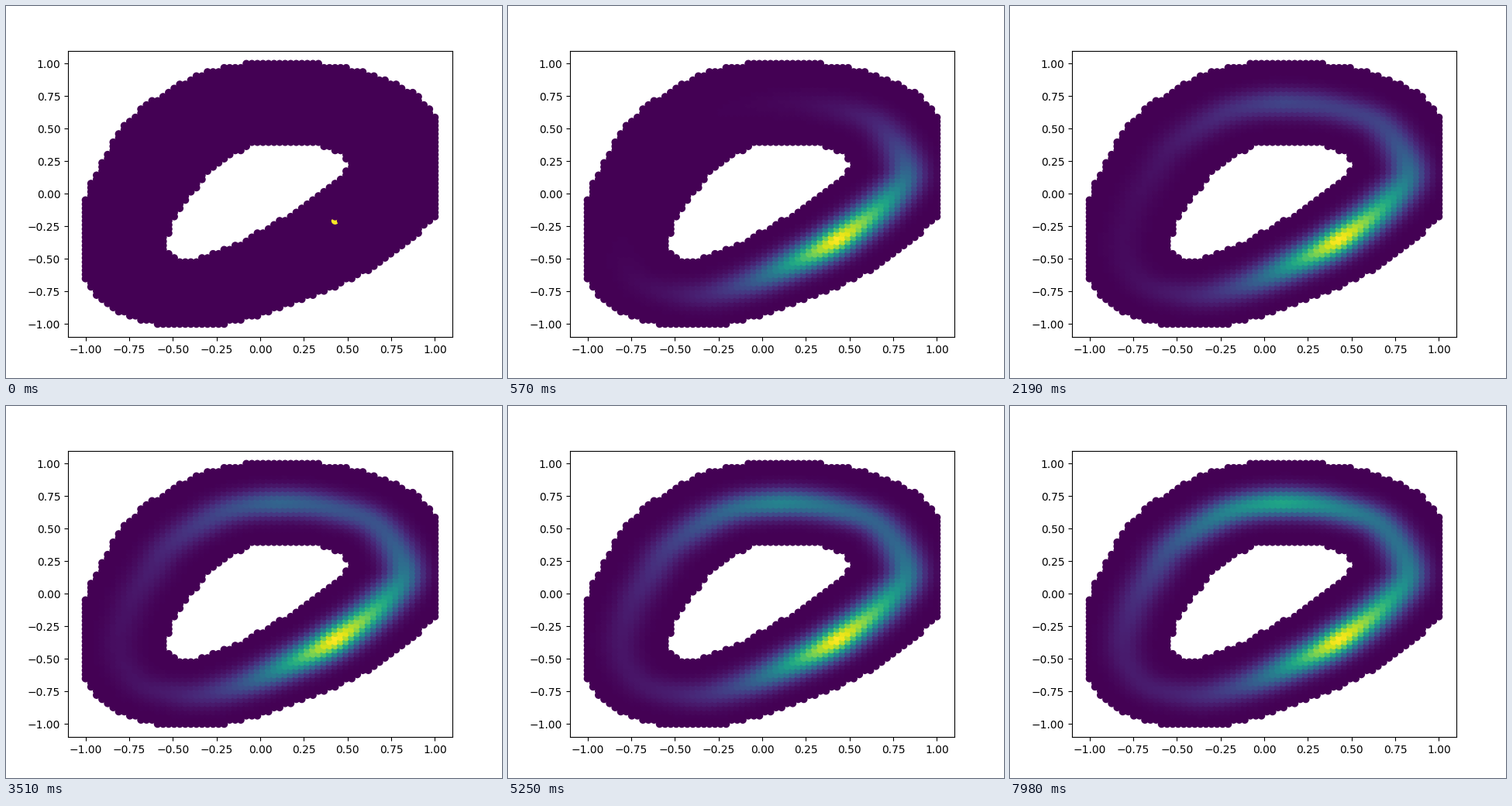
These frames come from a looping animation (640 by 480 pixels, 8000 ms). A matplotlib script:

```python
import numpy as np
import matplotlib.pyplot as plt
from matplotlib.animation import FuncAnimation

FRAMES, INTERVAL = 250, 32
GRID, STEPS = 64, 60
EARLY, END = 0.57, 7.98   # seconds
SIGMA = 0.073

# Key points of the ridge, from the main peak around to it again
RIDGE = np.array([(0.43, -0.345), (0.71, -0.05), (0.825, 0.20), (0.68, 0.53),
                  (0.42, 0.665), (0.10, 0.705), (-0.21, 0.635),
                  (-0.505, 0.39), (-0.635, 0.16), (-0.75, -0.10),
                  (-0.80, -0.42), (-0.68, -0.68), (-0.40, -0.765),
                  (-0.13, -0.70), (0.155, -0.54)])
TOP = 5   # key point of the second peak


def closed_spline(p, steps):
    """Catmull-Rom curve through the rows of p, closed."""
    u = np.linspace(0, 1, steps, endpoint=False)[None, :, None]
    a, b, c, d = (np.roll(p, s, axis=0)[:, None, :] for s in (1, 0, -1, -2))
    q = b + 0.5 * u * (c - a + u * (2 * a - 5 * b + 4 * c - d
                                    + u * (3 * (b - c) + d - a)))
    return q.reshape(-1, 2).T


def bump(s, left, right):
    """Peak of height 1 at s = 0 with its own reach on either side."""
    return np.exp(-(np.abs(s) / np.where(s < 0, left, right)) ** 1.4)


cx, cy = closed_spline(RIDGE, STEPS)
seg = np.hypot(np.roll(cx, -1) - cx, np.roll(cy, -1) - cy)
arc, length = np.cumsum(seg) - seg, seg.sum()


def nearest(x, y):
    """Index of the closest ridge sample and the signed distance to it."""
    near = np.argmin((x[:, None] - cx) ** 2 + (y[:, None] - cy) ** 2, axis=1)
    tx, ty = (np.roll(c, -1) - np.roll(c, 1) for c in (cx, cy))
    dx, dy = x - cx[near], y - cy[near]
    side = np.sign(tx[near] * dy - ty[near] * dx)
    return near, side * np.hypot(dx, dy)


def along(s, origin):
    """Signed arc distance from origin, the short way round."""
    return (s - origin + length / 2) % length - length / 2


# The domain is a band around the ridge, slightly thinner at lower left
axis = np.linspace(-1, 1, GRID)
x, y = (g.ravel() for g in np.meshgrid(axis, axis))
near, offset = nearest(x, y)
band = np.abs(offset) <= 0.312 - 0.05 * np.clip(-x - y, 0, 1)
x, y, near, offset = x[band], y[band], near[band], offset[band]

start = np.argmin(np.hypot(x - 0.43, y + 0.21))
from_start = along(arc[near], arc[near[start]])
main = bump(along(arc[near], 0), 0.50, 0.63)
from_top = along(arc[near], arc[TOP * STEPS])
second = 0.57 * bump(from_top, 0.68, 0.85)
lag = 1 + 0.5 * np.clip(from_top, 0, None)


def density(t):
    if t == 0:
        return (np.arange(len(x)) == start).astype(float)
    u = np.clip((t - EARLY) / (END - EARLY), 0, 1)
    fill = (1 - np.exp(-u)) / (1 - np.exp(-1))
    level = main + second * fill ** lag + 0.02 * np.sqrt(fill)
    # spreading out from the starting point
    level *= np.exp(-2 * from_start ** 2 * max(EARLY / t - 1, 0))
    # sliding onto the ridge while widening to the full cross-section
    relax = np.exp(-t / 0.08)
    sigma = SIGMA * np.sqrt(1 - relax ** 2)
    p = level * np.exp(-0.5 * ((offset - offset[start] * relax) / sigma) ** 2)
    return p / p.max()


fig, ax = plt.subplots(figsize=(6.4, 4.8), dpi=100)
dots = ax.scatter(x, y, c=density(0), cmap="viridis", vmin=0, vmax=1)
ax.set_xlim(-1.1, 1.1)
ax.set_ylim(-1.1, 1.1)


def update(i):
    dots.set_array(density(i * INTERVAL / 1000))
    return dots,


anim = FuncAnimation(fig, update, frames=FRAMES, interval=INTERVAL,
                     repeat=True, repeat_delay=0, blit=False)
plt.show()
```
